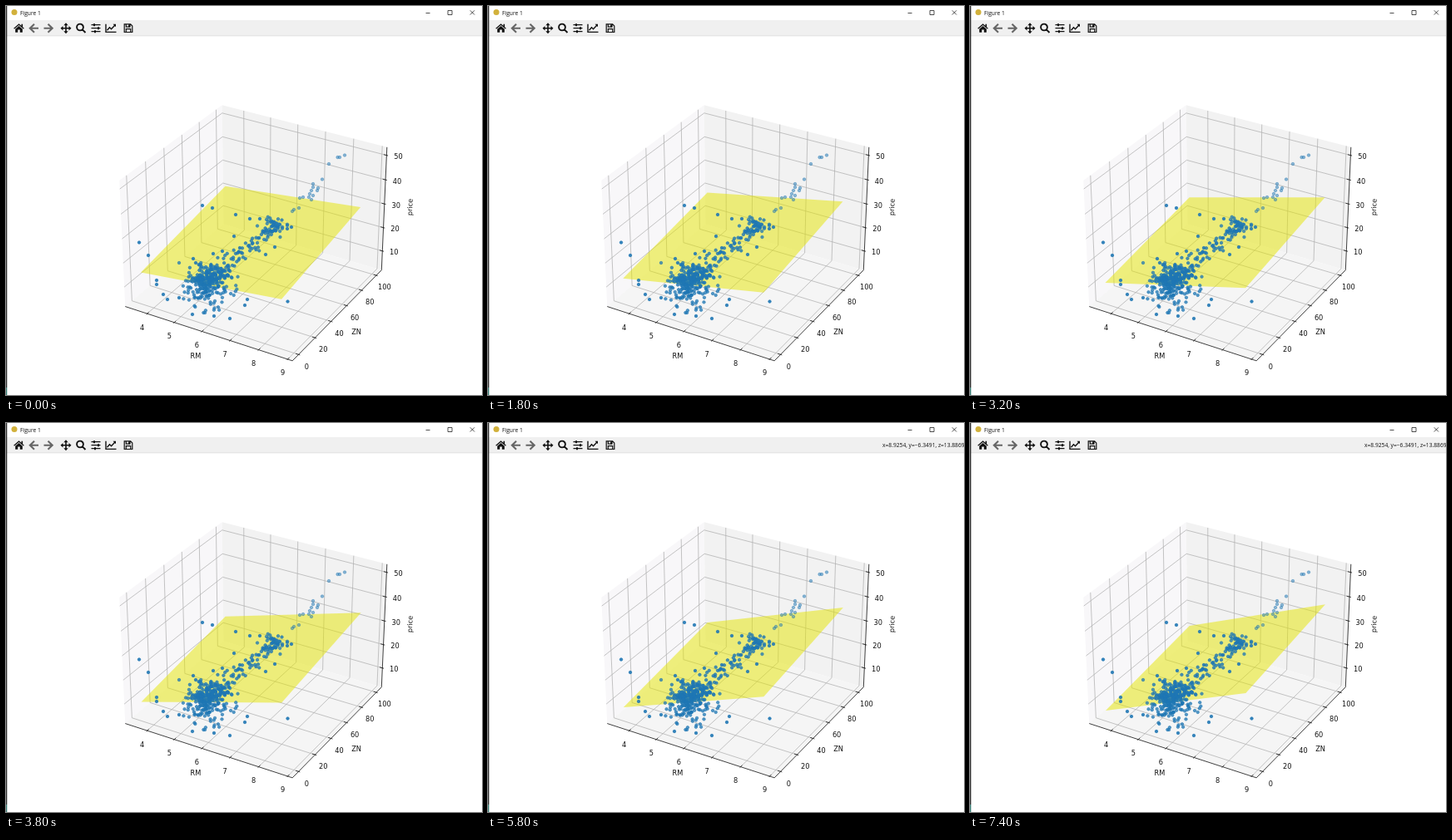
Recreate the animation shown at these times as an HTML page with a canvas. Size 572 by 468 pixels, loop 8000 ms.

```html
<!DOCTYPE html>
<html lang="en">
<head>
<meta charset="utf-8">
<title>Figure 1</title>
<style>
  html, body { margin: 0; width: 100%; height: 100%; overflow: hidden; background: #fff; }
  canvas { display: block; }
</style>
</head>
<body>
<canvas id="stage" width="572" height="468"></canvas>
<script>
const ctx = document.getElementById('stage').getContext('2d');
const LOOP = 8000;
const UI_FONT = '6.7px "Open Sans", sans-serif';
const PLOT_FONT = '8.2px "DejaVu Sans", sans-serif';

// ---- 3D view: elevation 30°, azimuth -60°, box of 4:4:3 ----
const H = 4 / 7, V = 3 / 7;
const project = ([x, y, z]) => {
  const depth = 10 - (0.433 * x - 0.75 * y + 0.5 * z);
  return [
    300 + 2015 * (0.866 * x + 0.5 * y) / depth,
    266 - 2015 * (-0.25 * x + 0.433 * y + 0.866 * z) / depth
  ];
};
const scale = (min, max, half) => v => ((v - min) / (max - min) * 2 - 1) * half;
const rm = scale(3.18, 9.161, H);
const zn = scale(-7.3, 107.3, H);
const price = scale(1.72, 53.28, V);

function trace(points) {
  ctx.beginPath();
  points.forEach(p => ctx.lineTo(...project(p)));
}
function fill(points, color) {
  trace(points);
  ctx.closePath();
  ctx.fillStyle = color;
  ctx.fill();
}
function line(points, color, width) {
  trace(points);
  ctx.strokeStyle = color;
  ctx.lineWidth = width;
  ctx.stroke();
}
function text(str, x, y, font, align = 'center') {
  ctx.font = font;
  ctx.textAlign = align;
  ctx.textBaseline = 'alphabetic';
  ctx.fillStyle = '#111';
  ctx.fillText(str, x, y);
}

// ---- axes ----
const corner = {
  left: [-H, -H, -V], front: [H, -H, -V], right: [H, H, -V], back: [-H, H, -V],
  leftTop: [-H, -H, V], rightTop: [H, H, V], backTop: [-H, H, V]
};
const axes = [
  { ticks: [4, 5, 6, 7, 8, 9], at: rm, dx: -6, dy: 16.4,
    grid: x => [[x, -H, -V], [x, H, -V], [x, H, V]],
    tick: x => [[x, -H + 0.019, -V], [x, -H - 0.0095, -V]],
    anchor: x => [x, -H, -V] },
  { ticks: [0, 20, 40, 60, 80, 100], at: zn, dx: 9.8, dy: 14.3,
    grid: y => [[H, y, -V], [-H, y, -V], [-H, y, V]],
    tick: y => [[H - 0.019, y, -V], [H + 0.0095, y, -V]],
    anchor: y => [H, y, -V] },
  { ticks: [10, 20, 30, 40, 50], at: price, dx: 14, dy: 1.7,
    grid: z => [[-H, -H, z], [-H, H, z], [H, H, z]],
    tick: z => [[H - 0.019, H, z], [H + 0.0095, H, z]],
    anchor: z => [H, H, z] }
];

function drawAxes() {
  const c = corner;
  fill([c.left, c.leftTop, c.backTop, c.back], '#f8f7f9');
  fill([c.back, c.backTop, c.rightTop, c.right], '#f2f2f2');
  fill([c.left, c.front, c.right, c.back], '#f5f5f5');
  for (const axis of axes)
    for (const v of axis.ticks) line(axis.grid(axis.at(v)), '#b0b0b0', 0.75);
  line([c.left, c.front, c.right, c.rightTop], '#111', 0.8);
  for (const axis of axes) {
    for (const v of axis.ticks) {
      const pos = axis.at(v);
      const [x, y] = project(axis.anchor(pos));
      line(axis.tick(pos), '#111', 0.8);
      text(v, x + axis.dx, y + axis.dy + 3, PLOT_FONT);
    }
  }
  text('RM', 228, 424, PLOT_FONT);
  text('ZN', 421, 395, PLOT_FONT);
  ctx.save();
  ctx.translate(486, 242);
  ctx.rotate(-87.7 * Math.PI / 180);
  text('price', 0, 2.3, PLOT_FONT);
  ctx.restore();
}

// ---- regression plane: one training step per 100 ms inside each span ----
const spans = [
  [100, 200], [400, 900], [1200, 2000], [2100, 2700], [2900, 3000], [3200, 4000],
  [4100, 4900], [5000, 5600], [5800, 6000], [6200, 6300], [6500, 6500], [6700, 7400]
];
const stepsAt = t => spans.reduce((sum, [from, to]) =>
  t < from ? sum : sum + Math.floor((Math.min(t, to) - from) / 100) + 1, 0);

function drawPlane(t) {
  const settle = n => 1 - Math.exp(-n / 105);
  const p = settle(stepsAt(t)) / settle(65);
  const base = -0.205 - 0.149 * p, riseX = 0.115 + 0.3025 * p, riseY = 0.122 - 0.017 * p;
  const [x0, x1, y0, y1] = [rm(3.561), rm(8.561), zn(0), zn(98)];
  fill([
    [x0, y0, base], [x0, y1, base + riseY],
    [x1, y1, base + riseX + riseY], [x1, y0, base + riseX]
  ], 'rgba(229,229,0,0.5)');
}

// ---- scatter: a dense cluster, its halo, a rising tail and single outliers ----
let seed = 11;
const random = () => (seed = seed * 16807 % 2147483647) / 2147483647;
const gauss = () => Math.sqrt(-2 * Math.log(random())) * Math.cos(2 * Math.PI * random());
const dots = [];
const addDot = (x, y, alpha) => dots.push({ x, y, alpha });

const nearOutliers = [
  236, 240, 248, 243, 276, 251, 293, 256, 274, 277, 160, 284.5, 171, 300, 181, 330,
  181, 335, 189, 347, 194, 353, 338.5, 355.5, 290, 353, 287, 360, 269, 376, 224, 371,
  225, 304, 228, 309, 249, 298, 260, 295, 281, 291, 305, 256, 343, 266, 338, 268,
  323, 290, 312, 299, 250, 373, 208, 351
];
const farOutliers = [
  407, 179.5, 401, 182, 398.5, 182, 388, 190, 380, 208.5, 369, 214, 369, 218, 375, 219,
  367, 222, 374, 222, 365, 226, 369, 228, 357, 230, 353, 231, 367, 233, 364, 230,
  352, 243, 346, 245, 344, 247
];
const addPairs = (list, alpha) => {
  for (let i = 0; i < list.length; i += 2) addDot(list[i], list[i + 1], alpha);
};
const clamp = (v, limit) => Math.max(-limit, Math.min(limit, v));

addPairs(farOutliers, 0.5);
for (let i = 0; i < 68; i++) {
  const k = random();
  addDot(263 + 65 * k + clamp(gauss(), 1.8) * 5, 314 - 52 * k + clamp(gauss(), 1.8) * 6, 0.8);
}
for (let i = 0; i < 36; i++)
  addDot(320 + clamp(gauss(), 2) * 9, 264 + clamp(gauss(), 2) * 7, 0.75);
for (let i = 0; i < 105; i++)
  addDot(246 + clamp(gauss(), 2) * 19, 339 + clamp(gauss(), 2) * 15, 0.75);
for (let i = 0; i < 185; i++) {
  const gx = clamp(gauss(), 2.2);
  addDot(245 + gx * 11, 328 - gx * 3 + clamp(gauss(), 2.2) * 9, 0.8);
}
addPairs(nearOutliers, 0.9);

function drawDots() {
  ctx.fillStyle = ctx.strokeStyle = '#1f77b4';
  ctx.lineWidth = 0.8;
  for (const { x, y, alpha } of dots) {
    ctx.globalAlpha = alpha;
    ctx.beginPath();
    ctx.arc(x, y, 1.75, 0, 2 * Math.PI);
    ctx.fill();
    ctx.stroke();
  }
  ctx.globalAlpha = 1;
}

// ---- window frame; icons are centred on their own origin ----
const arrow = 'M5.5 0H-4M.5-5L-4.7 0 .5 5';
const icons = [
  { x: 15.5, fill: 'M0-5.5L6.3 0 5.5 1 0-3.8-5.5 1-6.3 0ZM3-5H4.6V-.5L3-2ZM0-2.8L4.3 1V5H1.3V1.8H-1.3V5H-4.3V1Z' },
  { x: 33.5, stroke: arrow, width: 2.1, color: '#666' },
  { x: 51, stroke: arrow, width: 2.1, color: '#666', flip: true },
  { x: 72, stroke: 'M-5 0H5M0-5V5', width: 1.6,
    fill: 'M0-6.5L2.7-3.5H-2.7ZM0 6.5L2.7 3.5H-2.7ZM-6.5 0L-3.5-2.7V2.7ZM6.5 0L3.5-2.7V2.7Z' },
  { x: 90, stroke: 'M2.9-1.2A3.9 3.9 0 1 1-4.9-1.2A3.9 3.9 0 1 1 2.9-1.2M1.8 1.6L5.5 5.3', width: 1.9 },
  { x: 108, stroke: 'M-5.5-4H5.5M-5.5 0H5.5M-5.5 4H5.5', width: 1.2,
    fill: 'M-3-5.5H-1V-2.5H-3ZM2-1.5H4V1.5H2ZM-2 2.5H0V5.5H-2Z' },
  { x: 126, stroke: 'M-6-5V4.7H6.5M-4.5 2.5L-1.5-1 .5 1 5-3.8', width: 1.4, fill: 'M2.5-5H6V-1.5Z' },
  { x: 147, stroke: 'M-4.8-4.8H2.7L4.8-2.7V4.8H-4.8ZM-2.7 4.8V1H2.7V4.8M-2.7-4.5V-1.5H2V-4.5', width: 1.2,
    fill: 'M.2-4.5H2V-1.5H.2Z' }
].map(icon => ({
  ...icon,
  fill: icon.fill && new Path2D(icon.fill),
  stroke: icon.stroke && new Path2D(icon.stroke)
}));
const windowButtons = new Path2D(
  'M504.5 8.5H509.5M531 5.5H536V10.5H531ZM557.8 5.3L563 10.5M563 5.3L557.8 10.5');

function coordinates(t) {
  if (t < 4000) return '';
  return t < 5200 ? 'x=9.4497, y=−0.9442, z=20.5698' : 'x=8.9254, y=−6.3491, z=13.8869';
}

function drawWindow(t) {
  ctx.fillStyle = '#fff';
  ctx.fillRect(0, 0, 572, 468);
  ctx.fillStyle = '#f0f0f0';
  ctx.fillRect(0, 17, 572, 19);
  ctx.fillStyle = '#dcdcdc';
  ctx.fillRect(0, 35.5, 572, 0.8);
  ctx.fillStyle = '#333';
  ctx.fillRect(0, 0, 1.3, 459);
  ctx.fillStyle = '#3c8078';
  ctx.fillRect(0, 459, 1.3, 9);
  ctx.fillStyle = '#d2b13c';
  ctx.beginPath();
  ctx.arc(10, 7.5, 3.5, 0, 2 * Math.PI);
  ctx.fill();
  text('Figure 1', 17, 10.5, UI_FONT, 'left');
  ctx.strokeStyle = '#222';
  ctx.lineWidth = 0.8;
  ctx.stroke(windowButtons);
  for (const icon of icons) {
    ctx.save();
    ctx.translate(icon.x, 26.7);
    if (icon.flip) ctx.scale(-1, 1);
    ctx.fillStyle = ctx.strokeStyle = icon.color || '#111';
    ctx.lineWidth = icon.width;
    if (icon.stroke) ctx.stroke(icon.stroke);
    if (icon.fill) ctx.fill(icon.fill);
    ctx.restore();
  }
  text(coordinates(t), 474, 29, UI_FONT, 'left');
}

function frame() {
  const t = performance.now() % LOOP;
  drawWindow(t);
  drawAxes();
  drawPlane(t);
  drawDots();
  requestAnimationFrame(frame);
}
frame();
</script>
</body>
</html>
```
